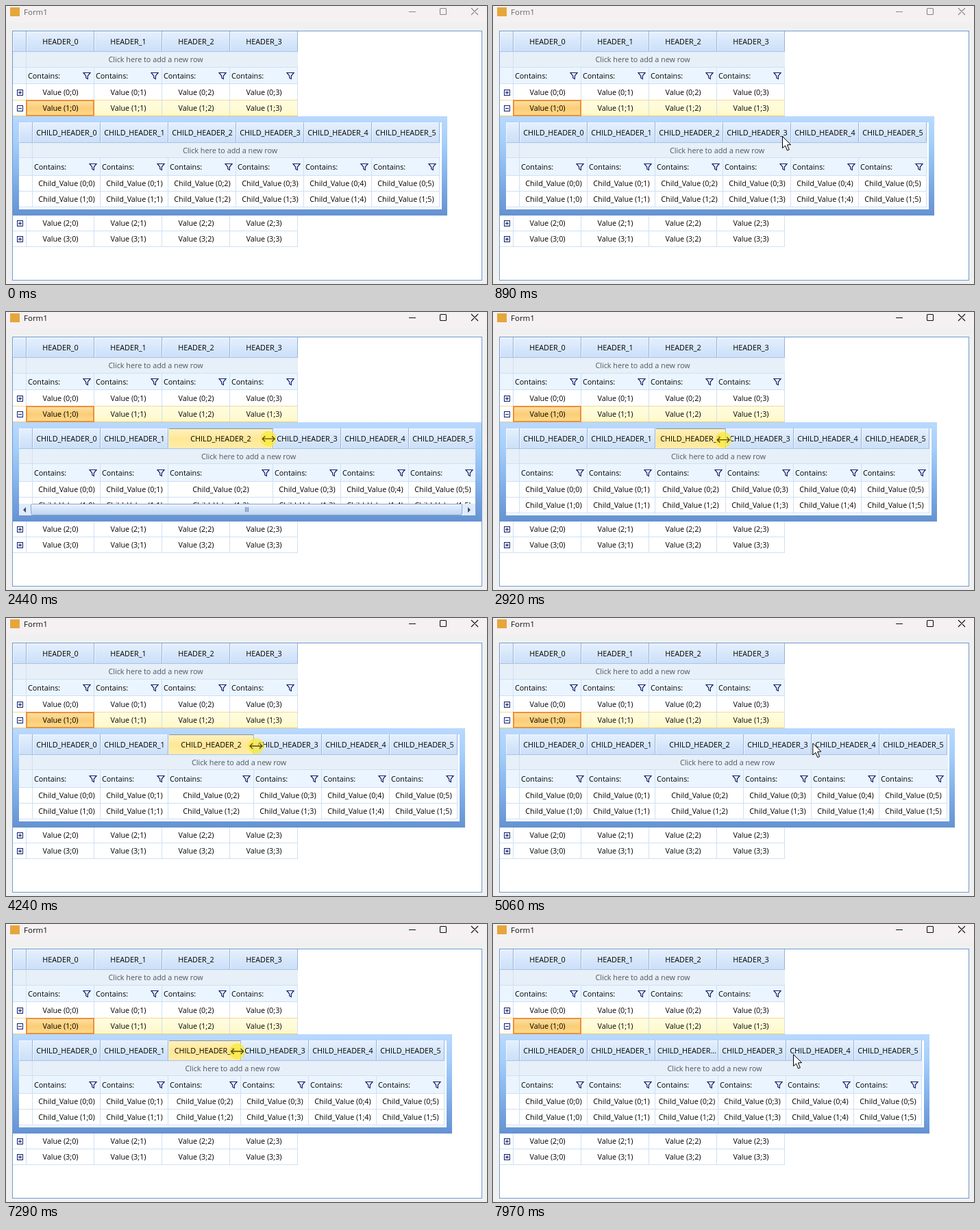
An HTML page with a canvas that plays this animation: 702x406 px, repeating every 8 s.

```html
<!DOCTYPE html>
<html lang="en">
<head>
<meta charset="utf-8">
<title>Form1</title>
<style>
  html, body { margin: 0; width: 100%; height: 100%; overflow: hidden; background: #f0f0f0; }
  canvas { display: block; }
</style>
</head>
<body>
<canvas id="stage" width="702" height="406"></canvas>
<script>
const ctx = document.getElementById('stage').getContext('2d');
const LOOP = 8000;
const FONT = '"Open Sans", "Noto Sans", sans-serif';
const LINE = '#cfe0f3', EDGE = '#96b4dc', INK = '#000', NAVY = '#10206e';
const CELL = 99, COL2 = 237, LAG = 40;

// Pointer moves: start, end, target x, target y; each slows down at its end
const moves = [
  [130, 890, 422, 190],
  [950, 1150, 336, 185],
  [1770, 2240, 389, 185],
  [2400, 3260, 326.5, 187],
  [4110, 4245, 365, 187],
  [4560, 4910, 467, 183],
  [4990, 6140, 461, 179],
  [6280, 6900, 365, 186],
  [7090, 7500, 328, 186],
  [7690, 7970, 438, 190]
];
const resizing = [[1420, 4560], [6690, 7690]];
const drags = [[1770, 3450], [4110, 4560], [7090, 7690]];

const during = (spans, t) => spans.some(([a, b]) => t >= a && t < b);

function mouse(t) {
  let x = 631, y = 396;
  for (const [a, b, tx, ty] of moves) {
    const p = Math.min(1, Math.max(0, (t - a) / (b - a)));
    const e = 1 - (1 - p) ** 2;
    x += (tx - x) * e;
    y += (ty - y) * e;
  }
  return { x, y };
}

// The column edge follows the pointer a little late while it is dragged
function columnWidth(t) {
  const drag = drags.filter(d => d[0] <= t).pop();
  return drag ? Math.round(mouse(Math.min(t, drag[1]) - LAG).x - COL2 + 1) : CELL;
}

function box(x, y, w, h, fill) {
  ctx.fillStyle = fill;
  ctx.fillRect(x, y, w, h);
}

function shade(y, h, ...stops) {
  const g = ctx.createLinearGradient(0, y, 0, y + h);
  stops.forEach((c, i) => g.addColorStop(i / (stops.length - 1), c));
  return g;
}

function frame(x, y, w, h, color, thick = 1) {
  ctx.strokeStyle = color;
  ctx.lineWidth = thick;
  ctx.strokeRect(x + thick / 2, y + thick / 2, w - thick, h - thick);
}

function poly(points, fill) {
  ctx.beginPath();
  points.forEach(([x, y]) => ctx.lineTo(x, y));
  ctx.closePath();
  ctx.fillStyle = fill;
  ctx.fill();
}

function outline(color, width) {
  ctx.strokeStyle = color;
  ctx.lineWidth = width;
  ctx.stroke();
}

function label(text, x, y, align = 'center', color = INK, size = 10.8) {
  ctx.font = size + 'px ' + FONT;
  ctx.textAlign = align;
  ctx.fillStyle = color;
  ctx.fillText(text, x, y);
}

function funnel(x, y) {
  poly([[x - 5, y - 4.5], [x + 5, y - 4.5], [x + 1.3, y], [x + 1.3, y + 4.5], [x - 1.3, y + 3], [x - 1.3, y]], '#fff');
  outline(NAVY, 1.2);
}

function expander(y, open) {
  box(16, y - 4, 9, 9, '#fff');
  frame(16, y - 4, 9, 9, NAVY);
  box(18, y, 5, 1, NAVY);
  if (!open) box(20, y - 2, 1, 5, NAVY);
}

function header(x, y, w, h, text, hot) {
  box(x, y, w, h, hot ? shade(y, h, '#fff2c2', '#ffe795', '#ffedaa')
                      : shade(y, h, '#e6f0fd', '#d7e7fb', '#cbdff8'));
  box(x, y, w, 1, hot ? '#8d9297' : '#f2f7fe');
  box(x, y, 1, h, hot ? '#fff8dc' : '#f2f7fe');
  box(x + w - 1, y, 1, h, EDGE);
  box(x, y + h - 1, w, 1, '#a9c4e6');
  if (text) label(text, x + w / 2, y + h / 2 + 4);
}

function cell(x, y, w, h, text) {
  box(x + w - 1, y, 1, h, LINE);
  box(x, y + h - 1, w, 1, LINE);
  if (text) label(text, x + w / 2, y + Math.floor(h / 2) + 4);
}

function filterCell(x, y, w, h, titled) {
  box(x, y, w, h, '#ebf5ff');
  cell(x, y, w, h);
  if (!titled) return;
  const mid = y + h / 2;
  label('Contains:', x + 2, mid + 4, 'left');
  funnel(x + w - 11, mid);
}

function newRow(right, x, y, h) {
  box(x, y, right - x, h, '#e7eff8');
  cell(x, y, 20, h);
  box(x, y + h - 1, right - x, 1, LINE);
  label('Click here to add a new row', (x + right) / 2 + .5, y + 15, 'center', '#50565f');
}

function titleBar(active) {
  box(0, 0, 702, 24, '#f5f1f2');
  box(6, 2, 14, 13, '#e5a63c');
  label('Form1', 26, 13, 'left', active ? '#111' : '#666', 11.5);
  const c = active ? '#101010' : '#8c8484';
  box(588, 8, 10, 1, c);
  ctx.beginPath();
  ctx.roundRect(633.5, 3.5, 9, 9, 1);
  ctx.moveTo(679, 3); ctx.lineTo(689, 13);
  ctx.moveTo(689, 3); ctx.lineTo(679, 13);
  outline(c, 1.1);
}

function mainGrid() {
  box(9, 36, 686, 365, '#fff');
  frame(9, 36, 686, 365, '#6f9bd2');
  header(10, 37, 20, 30);
  newRow(426, 10, 67, 23);
  filterCell(10, 90, 20, 24);

  box(30, 138, 396, 23, shade(138, 23, '#fffde2', '#fff8c8'));
  for (let c = 0; c < 4; c++) {
    const x = 30 + c * CELL;
    header(x, 37, CELL, 30, 'HEADER_' + c);
    filterCell(x, 90, CELL, 24, true);
  }
  [114, 138, 306, 329].forEach((y, r) => {
    const h = r ? 23 : 24;
    cell(10, y, 20, h);
    for (let c = 0; c < 4; c++) cell(30 + c * CELL, y, CELL, h, `Value (${r};${c})`);
    expander(y + (r ? 11 : 12), r === 1);
  });
  box(10, 137, 416, 1, '#f7d88a');
  box(10, 160, 416, 1, '#f3c873');
  box(30, 138, CELL, 23, shade(138, 23, '#fce0a4', '#fbcd76', '#fddc90'));
  frame(29, 137, CELL + 1, 24, '#ee9036', 2);
  label('Value (1;0)', 30 + CELL / 2, 153);
}

function scrollBar(total) {
  const y = 280, face = shade(y, 17, '#eef5fe', '#d3e3f8', '#bcd3f1');
  box(19, y, 666, 17, shade(y, 17, '#dbe7f6', '#eff5fd'));
  const len = 631 * Math.min(1, 666 / total);
  ctx.beginPath();
  ctx.roundRect(36.5, y + .5, len, 16, 2);
  ctx.fillStyle = face;
  ctx.fill();
  outline('#86a5cf', 1);
  const mid = Math.round(36 + len / 2) - 2;
  for (let i = 0; i < 3; i++) box(mid + i * 2, y + 5, 1, 7, '#5f7fae');
  for (const [x, dir] of [[27, -1], [676, 1]]) {
    box(x - 8, y, 16, 17, '#dfebfa');
    poly([[x - dir * 2, y + 5], [x - dir * 2, y + 13], [x + dir * 2, y + 9]], '#3d4c66');
  }
}

function childGrid(w, hot) {
  const end = 535 + w;
  const scrolls = end > 685;
  const right = scrolls ? 685 : end + 2;
  box(10, 161, Math.min(545 + w, 694) - 10, 145,
    shade(161, 145, '#b9d9fe', '#a6cffa', '#8ebcf1', '#78a6e2', '#6592d1'));
  box(19, 170, right - 19, 127, '#fff');

  ctx.save();
  ctx.beginPath();
  ctx.rect(19, 170, right - 19, scrolls ? 110 : 127);
  ctx.clip();
  header(19, 170, 20, 30);
  newRow(end, 19, 200, 22);
  filterCell(19, 222, 20, 26);
  for (let r = 0; r < 2; r++) cell(19, 248 + r * 23, 20, 23);

  let x = 39;
  for (let c = 0; c < 6; c++) {
    const cw = c === 2 ? w : CELL;
    header(x, 170, cw, 30, cw < 96 ? 'CHILD_HEADER...' : 'CHILD_HEADER_' + c, hot && c === 2);
    filterCell(x, 222, cw, 26, true);
    for (let r = 0; r < 2; r++) cell(x, 248 + r * 23, cw, 23, `Child_Value (${r};${c})`);
    x += cw;
  }
  ctx.restore();
  if (scrolls) scrollBar(515 + w);
}

function arrow(x, y) {
  const shape = [[0, 0], [0, 17], [4, 13.4], [7, 20.5], [9.8, 19.3], [6.8, 12.4], [12, 12]];
  poly(shape.map(([a, b]) => [x + .5 + a, y + .5 + b]), '#fff');
  outline('#000', 1);
}

function resizer(x, y, pressed) {
  if (pressed) {
    ctx.beginPath();
    ctx.arc(x, y, 11.5, 0, 7);
    ctx.fillStyle = 'rgba(250, 234, 50, .72)';
    ctx.fill();
  }
  ctx.beginPath();
  ctx.moveTo(x - 9, y);
  ctx.lineTo(x + 9, y);
  for (const d of [-1, 1]) {
    ctx.moveTo(x + d * 5, y - 4);
    ctx.lineTo(x + d * 9, y);
    ctx.lineTo(x + d * 5, y + 4);
  }
  if (!pressed) outline('#fff', 3);
  outline(pressed ? '#5c4a18' : '#111', 1.3);
}

function draw(t) {
  const { x, y } = mouse(t);
  const w = columnWidth(t);
  const sizing = during(resizing, t);
  const hovered = y < 200 && x < COL2 + w + 3;
  box(0, 0, 702, 406, '#f0f0f0');
  titleBar(t >= drags[0][0]);
  mainGrid();
  childGrid(w, sizing || hovered);
  if (sizing) resizer(x, y, during(drags, t));
  else if (t >= moves[0][0]) arrow(x, y);
}

const start = performance.now();
function tick() {
  draw((performance.now() - start) % LOOP);
  requestAnimationFrame(tick);
}
tick();
</script>
</body>
</html>
```
